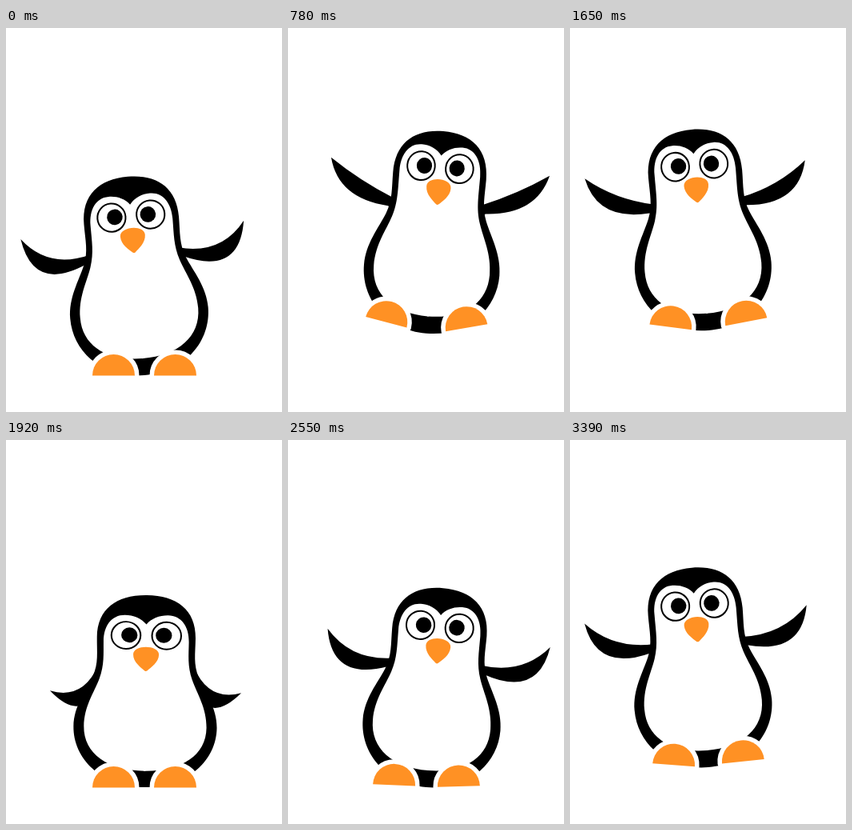
Animation, 345 px wide and 480 px high, one loop 3.42 s. Source, as an HTML page:

```html
<!DOCTYPE html>
<html lang="en">
<head>
<meta charset="utf-8">
<title>Hopping penguin</title>
<style>
  html, body { margin: 0; width: 100%; height: 100%; overflow: hidden; background: #fff; }
  svg { display: block; width: 345px; height: 480px; }
  .beak, .foot { fill: #ff9124; }
  .foot { stroke: #fff; stroke-width: 11; stroke-linejoin: round; paint-order: stroke; }
  .ring { fill: #fff; stroke: #000; stroke-width: 2; }
  .belly { fill: #fff; }
</style>
</head>
<body>
<svg viewBox="0 0 345 480">
  <g id="lean">
    <path class="wing" transform="scale(-1 1)"/>
    <path class="wing"/>
    <g id="body">
      <path d="M0-249C36-249 59.5-231 59.5-194C59.5-174 57-160 64-143C72-124 86.5-104 86.5-78C86.5-36 52 0 0 0
               C-52 0-86.5-36-86.5-78C-86.5-104-72-124-64-143C-57-160-59.5-174-59.5-194C-59.5-231-36-249 0-249Z"/>
      <path class="belly half" transform="scale(-1 1)"/>
      <path class="belly half"/>
      <g id="face">
        <circle class="ring" cx="-24.5" cy="-199.6" r="17.6"/>
        <circle class="ring" cx="24.5" cy="-199.6" r="17.6"/>
        <circle cx="-20.4" cy="-200" r="9.8"/>
        <circle cx="21.2" cy="-200" r="9.8"/>
        <path class="beak" d="M-15.5-175C-15.5-188 15.5-188 15.5-175C15.5-165 6-158 1.5-154Q0-153-1.5-154C-6-158-15.5-165-15.5-175Z"/>
      </g>
    </g>
  </g>
  <path class="foot" d="M-26.5 0A26.5 26.5 0 0 1 26.5 0Z"/>
  <path class="foot" d="M-26.5 0A26.5 26.5 0 0 1 26.5 0Z"/>
</svg>
<script>
const HOP = 855, STEP = 30, CX = 173, LEAN = 4.8;
const rad = Math.PI / 180;

// time, base y, stretch, face lift, wing flare, foot flare, foot offset
const keys = [
  [0,   434, 1,     0,  0,    0,    0],
  [60,  434, .93,   0,  -.7,  0,    0],
  [130, 434, .89,   -2, -2.2, 0,    0],
  [180, 434, .92,   -3, -2.5, 0,    0],
  [230, 434, .99,   -3, -2.2, 0,    0],
  [315, 385, 1.03,  -1, -.05, .24,  6.7],
  [390, 349, 1.035, 3,  .55,  .65,  0],
  [480, 331, 1.03,  5,  1,    1,    -7],
  [560, 327, 1.03,  5,  1.08, 1.05, -9],
  [675, 331, 1.027, 5,  .92,  .9,   -10],
  [780, 364, 1.018, 5,  .56,  .6,   -11],
  [795, 378, 1.012, 5,  .41,  .45,  -8],
  [825, 409, 1.005, 3,  .2,   .25,  -5.5]
];
const count = keys.length;

const key = (i, c) => {
  const lap = Math.floor(i / count), row = keys[i - lap * count];
  return c ? row[c] : row[0] + lap * HOP;
};
const slope = (i, c) => (key(i + 1, c) - key(i, c)) / (key(i + 1, 0) - key(i, 0));

// Monotone tangent: flat at extremes, so nothing overshoots
function tangent(i, c) {
  const a = slope(i - 1, c), b = slope(i, c);
  return a * b > 0 ? 2 * a * b / (a + b) : 0;
}

function sample(c, t) {
  let i = 0;
  while (key(i + 1, 0) <= t) i++;
  const d = key(i + 1, 0) - key(i, 0), u = (t - key(i, 0)) / d;
  const u2 = u * u, u3 = u2 * u, h = 3 * u2 - 2 * u3;
  return key(i, c) * (1 - h) + key(i + 1, c) * h +
    d * (tangent(i, c) * (u3 - 2 * u2 + u) + tangent(i + 1, c) * (u3 - u2));
}

function smooth(u) {
  u = Math.min(1, Math.max(0, u));
  return u * u * (3 - 2 * u);
}

const $ = id => document.getElementById(id);
const all = s => [...document.querySelectorAll(s)];
const wings = all('.wing'), halves = all('.half'), feet = all('.foot');
const put = (el, value) => el.setAttribute('transform', value);

function wingPath(flare, stretch) {
  const up = Math.max(flare, 0);
  const angle = (21.5 + 18.5 * flare) * rad, len = 88 + 9 * flare;
  const sag = 21.5 * (1 - up);
  const ry = -150 * Math.min(stretch, 1) - 18 * up;
  const cos = Math.cos(angle), sin = Math.sin(angle);
  const at = (along, down) =>
    `${(58 + along * cos + down * sin).toFixed(2)} ${(ry - along * sin + down * cos).toFixed(2)}`;
  const mid = len / 2;
  return `M${at(-10, -6)}L${at(0, -6)}Q${at(mid, 2 * (sag - 10) + 3)} ${at(len, 0)}` +
    `Q${at(mid + 9, 2 * (sag + 10) - 3)} ${at(0, 6)}L${at(-10, 6)}Z`;
}

function bellyPath(lift) {
  const y = v => v - lift;
  return `M-1 ${y(-213)}L0 ${y(-214)}C6 ${y(-222)} 16 ${y(-226)} 26 ${y(-226)}` +
    `C42 ${y(-226)} 51.5 ${y(-212)} 51.5 ${y(-192)}` +
    `C51.5 -172 50 -158 56 -140C62 -122 74 -104 74 -78C74 -42 44 -21 0 -21L-1 -21Z`;
}

function draw(ms) {
  const t = Math.floor(ms / STEP) * STEP % (2 * HOP);
  const first = t < HOP, v = first ? t : t - HOP;
  // The first hop lands slightly sooner
  const fall = first ? Math.min(HOP, v * HOP / 835) : v;
  const y = sample(1, fall);
  const [stretch, lift, flare, splay, drop] = [2, 3, 4, 5, 6].map(c => sample(c, v));
  const lean = (first ? 1 : -1) * (2 * smooth((v - 100) / 200) - 1);

  put($('lean'), `translate(${CX} ${y}) rotate(${lean * LEAN})`);
  put($('body'), `scale(${2 - stretch} ${stretch})`);
  put($('face'), `translate(0 ${-lift})`);
  const wing = wingPath(flare, stretch), belly = bellyPath(lift);
  wings.forEach(w => w.setAttribute('d', wing));
  halves.forEach(h => h.setAttribute('d', belly));

  const tilt = Math.tan(lean * 4 * Math.min(1, 3 * splay) * rad);
  feet.forEach((foot, i) => {
    const dx = (i ? 1 : -1) * (38.5 + 19.5 * splay);
    const turn = (i ? -20.5 : 20.5) * splay + 4 * lean * splay;
    put(foot, `translate(${CX + dx} ${y + .5 + drop + dx * tilt}) rotate(${turn})`);
  });
}

const start = performance.now();
function tick() {
  draw(performance.now() - start);
  requestAnimationFrame(tick);
}
tick();
</script>
</body>
</html>
```
